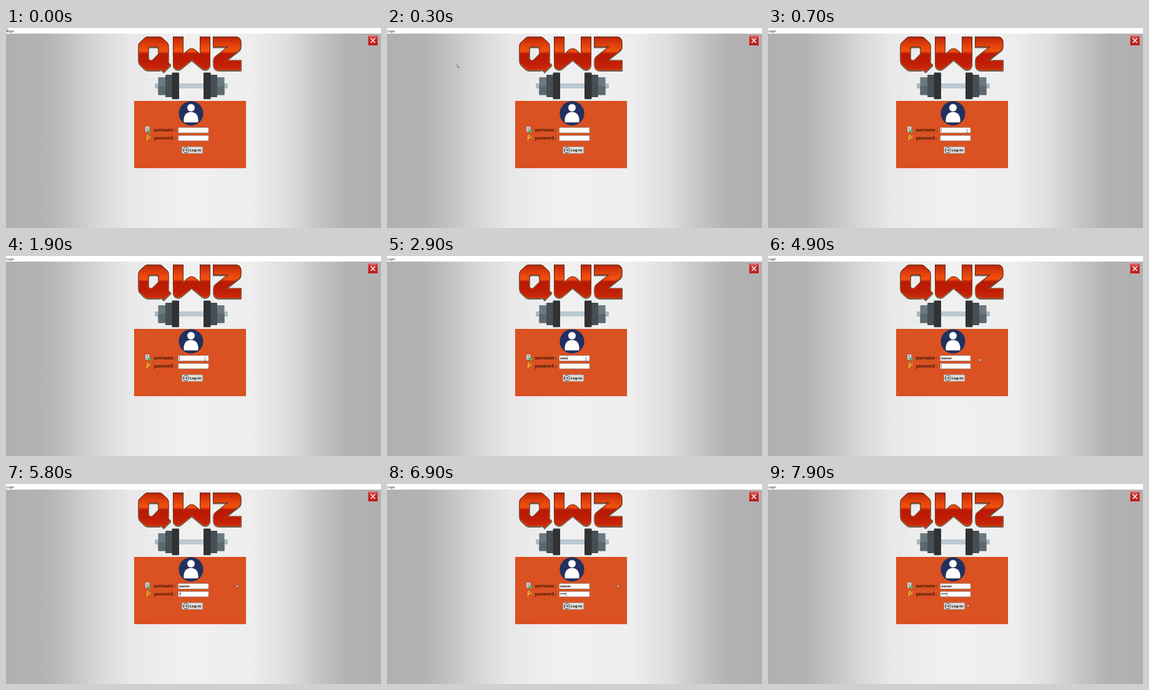
Write an HTML page that moves like this. It is 600 px wide and 321 px high and loops after 8 s.

```html
<!DOCTYPE html>
<html lang="en">
<head>
<meta charset="utf-8">
<title>Login</title>
<style>
  html, body { margin: 0; width: 100%; height: 100%; overflow: hidden; background: #fff; }
  svg { display: block; width: 100vw; height: 100vh; }
  .label { font: 6.55px "Noto Serif", serif; fill: #1c0c06; stroke: #1c0c06; stroke-width: .1; }
  .bold { font: 700 5.5px "Noto Sans", sans-serif; fill: #111; }
  .dots { font: 700 5.8px "Liberation Sans", sans-serif; fill: #111; }
  .field { fill: #fff; stroke: #8a7c74; stroke-width: .7; }
  .word use { fill: none; stroke-linecap: square; stroke-linejoin: round; }
</style>
</head>
<body>
<svg viewBox="0 0 600 321" preserveAspectRatio="none">
  <defs>
    <linearGradient id="wall">
      <stop offset="0" stop-color="#b0b0b0"/>
      <stop offset=".1" stop-color="#b3b3b3"/>
      <stop offset=".16" stop-color="#c0c0c0"/>
      <stop offset=".24" stop-color="#d6d6d6"/>
      <stop offset=".33" stop-color="#e8e8e8"/>
      <stop offset=".46" stop-color="#f0f0f0"/>
      <stop offset=".65" stop-color="#eeeeee"/>
      <stop offset=".75" stop-color="#dedede"/>
      <stop offset=".83" stop-color="#c6c6c6"/>
      <stop offset=".91" stop-color="#b2b2b2"/>
      <stop offset="1" stop-color="#b0b0b0"/>
    </linearGradient>
    <radialGradient id="glow" gradientUnits="userSpaceOnUse" r="100" gradientTransform="translate(294 171) scale(1 .8)">
      <stop offset="0" stop-color="#f29850"/>
      <stop offset=".4" stop-color="#e97a38"/>
      <stop offset=".8" stop-color="#de5a26"/>
      <stop offset="1" stop-color="#da5122"/>
    </radialGradient>
    <linearGradient id="fire" gradientUnits="userSpaceOnUse" x1="0" y1="14" x2="0" y2="69">
      <stop offset="0" stop-color="#b8240a"/>
      <stop offset=".2" stop-color="#dc3c0c"/>
      <stop offset=".42" stop-color="#f4510f"/>
      <stop offset=".5" stop-color="#b81a06"/>
      <stop offset=".75" stop-color="#c01c06"/>
      <stop offset="1" stop-color="#cc2c0a"/>
    </linearGradient>
    <linearGradient id="gold" gradientUnits="userSpaceOnUse" x1="0" y1="14" x2="0" y2="69">
      <stop offset="0" stop-color="#7d2a0c"/>
      <stop offset=".5" stop-color="#9c4a16"/>
      <stop offset="1" stop-color="#d48a34"/>
    </linearGradient>
    <linearGradient id="red" x2="0" y2="1">
      <stop offset="0" stop-color="#d04a4a"/>
      <stop offset=".35" stop-color="#c62828"/>
      <stop offset="1" stop-color="#b41c1c"/>
    </linearGradient>
    <path id="letters" d="M227 22.3H245L252 29V53L245 60H227L220 53V29ZM245 52L252.4 59.5
      M275.5 22.3V59L297 41L318.5 59V22.3
      M339.5 22.3H368V30L340 52V60H368.2"/>
    <g id="plates">
      <rect x="-58.5" y="-4" width="8" height="8" rx="1" fill="#a9bac4"/>
      <rect x="-53" y="-14" width="11.5" height="28.5" rx="1.2" fill="#6c7980"/>
      <rect x="-53" y="0" width="11.5" height="14.5" rx="1.2" fill="#5d696f"/>
      <rect x="-41.5" y="-18" width="11.5" height="36" rx="1.2" fill="#464f54"/>
      <rect x="-31" y="-21.5" width="11.5" height="42.8" rx="1.4" fill="#303234"/>
    </g>
  </defs>

  <rect width="600" height="321" fill="#fff"/>
  <rect y="9" width="600" height="312" fill="url(#wall)"/>
  <text x=".4" y="6.8" font-size="4.8" font-family="Noto Sans, sans-serif" fill="#222">Login</text>

  <rect x="579" y="11.8" width="16.2" height="16.6" rx="1" fill="url(#red)" stroke="#dcc4c2" stroke-width=".8"/>
  <path d="M581.5 14H592.5" stroke="#e39a9a" stroke-width=".8"/>
  <path d="M583.6 16.4L590.6 23.8M590.6 16.4L583.6 23.8" stroke="#f3dede" stroke-width="1.8"/>

  <g class="word" role="img" aria-label="QWZ">
    <use href="#letters" y="1.6" stroke="#3a2a22" stroke-opacity=".6" stroke-width="17"/>
    <use href="#letters" stroke="#3c1408" stroke-width="17"/>
    <use href="#letters" stroke="url(#gold)" stroke-width="16"/>
    <use href="#letters" stroke="url(#fire)" stroke-width="14.8"/>
  </g>

  <g transform="translate(296.5 93)">
    <rect x="-21" y="-4" width="42" height="8" fill="#bac9d2"/>
    <use href="#plates"/>
    <use href="#plates" transform="scale(-1 1)"/>
  </g>

  <rect x="205" y="117" width="179" height="108" fill="url(#glow)"/>
  <circle cx="296" cy="137" r="19.6" fill="#20305f"/>
  <path d="M284.3 149C284.3 139.5 289 134.8 296 134.8S307.7 139.5 307.7 149Q307.7 151.6 305 151.6H287Q284.3 151.6 284.3 149Z" fill="#fff"/>
  <circle cx="296" cy="128" r="6.4" fill="#fff" stroke="#20305f" stroke-width=".8"/>

  <g>
    <rect x="223" y="158" width="6.4" height="8.6" rx=".6" fill="#e4e6ea" stroke="#777b84" stroke-width=".5"/>
    <circle cx="226" cy="160.8" r="1.3" fill="#6d7488"/>
    <path d="M224 165Q226 161.6 228 165Z" fill="#6d7488"/>
    <circle cx="229.4" cy="165.6" r="2.7" fill="#2fa84a"/>
    <path d="M228 165.6L229.1 166.7L231 164.5" fill="none" stroke="#fff" stroke-width=".7"/>
    <path d="M227 175L224.5 180.2M225.5 178L227 179" stroke="#e9b52a" stroke-width="1.5"/>
    <circle cx="228" cy="174.2" r="2.2" fill="none" stroke="#f0c23a" stroke-width="1.5"/>
    <path d="M229 176.4L230.3 180" stroke="#a8691c" stroke-width="1.2"/>
    <circle cx="229.3" cy="172.4" r=".9" fill="#4d5a3a"/>
  </g>

  <text class="label" x="236.2" y="165.8">username :</text>
  <text class="label" x="236.8" y="179.2">password :</text>
  <rect class="field" x="275.7" y="159.8" width="48.4" height="8.5"/>
  <rect class="field" x="275.7" y="172.4" width="48.4" height="8.6"/>
  <text class="bold" id="user" x="277" y="166.2"></text>
  <text class="dots" id="pass" x="277" y="178.7"></text>
  <rect id="caret" width=".6" height="6.2" fill="#333"/>

  <rect x="281.6" y="190.6" width="33.2" height="10.6" fill="#dddcd9" stroke="#96908b" stroke-width=".8"/>
  <circle cx="287.8" cy="196" r="4.1" fill="#efefee" stroke="#222" stroke-width=".9"/>
  <path d="M283.5 196H290M287.8 193.8L290 196L287.8 198.2" fill="none" stroke="#222" stroke-width=".9"/>
  <text class="bold" x="293.8" y="198.1" style="font-size:6px">Log-in</text>

  <path id="arrow" d="M0 0V5L1.2 4L2 5.8L2.9 5.4L2.1 3.7H3.6Z" fill="#fff" stroke="#222" stroke-width=".5"/>
  <path id="beam" d="M-1 -2.5H1M0 -2.5V2.5M-1 2.5H1" fill="none" stroke="#444" stroke-width=".6"/>
</svg>
<script>
  const LOOP = 8000, TICK = 100;
  const $ = id => document.getElementById(id);
  const user = $('user'), pass = $('pass'), caret = $('caret'), arrow = $('arrow'), beam = $('beam');

  // pointer stops: time, x, y
  const route = [
    [100, 0, 0], [600, 318.5, 165.3], [4000, 318.5, 165.3], [4200, 317, 166],
    [4600, 317, 166], [5300, 368.8, 161.3], [7100, 368.8, 161.3],
    [7300, 367, 176], [7500, 355, 189], [7800, 319, 192.8], [8000, 319, 192.8]
  ];
  const name = 'owner', secret = '****';
  const nameKeys = [2700, 2800, 2900, 3100, 3300];
  const secretKeys = [5700, 6000, 6200, 6500];
  const focusUser = 700, focusPass = 4700;

  const typed = (keys, t) => keys.filter(k => k <= t).length;
  const ease = p => p * p * (3 - 2 * p);

  function pointer(t) {
    const i = route.findIndex(stop => stop[0] > t);
    if (i < 1) return route[0].slice(1);
    const [t0, x0, y0] = route[i - 1], [t1, x1, y1] = route[i];
    const p = ease((t - t0) / (t1 - t0));
    return [x0 + (x1 - x0) * p, y0 + (y1 - y0) * p];
  }

  function draw(t) {
    user.textContent = name.slice(0, typed(nameKeys, t));
    pass.textContent = secret.slice(0, typed(secretKeys, t));

    // the caret blinks, starting over at each key
    const inPass = t >= focusPass;
    const marks = [focusUser, ...nameKeys, focusPass, ...secretKeys].filter(k => k <= t);
    const shown = marks.length && (t - marks[marks.length - 1]) % 1000 < 500;
    const box = inPass ? pass : user;
    const width = box.textContent ? box.getComputedTextLength() : 0;
    caret.setAttribute('x', 277.1 + width);
    caret.setAttribute('y', inPass ? 173.6 : 161);
    caret.style.display = shown ? '' : 'none';

    const [x, y] = pointer(t);
    const overField = x > 275 && x < 324 && y > 159 && y < 169;
    for (const shape of [arrow, beam]) {
      shape.setAttribute('transform', `translate(${x} ${y})`);
      shape.style.display = (shape === beam) === overField ? '' : 'none';
    }
  }

  const start = performance.now();
  function frame(now) {
    const t = Math.max(0, now - start) % LOOP;
    draw(Math.floor(t / TICK) * TICK);
    requestAnimationFrame(frame);
  }
  draw(0);
  requestAnimationFrame(frame);
</script>
</body>
</html>
```
